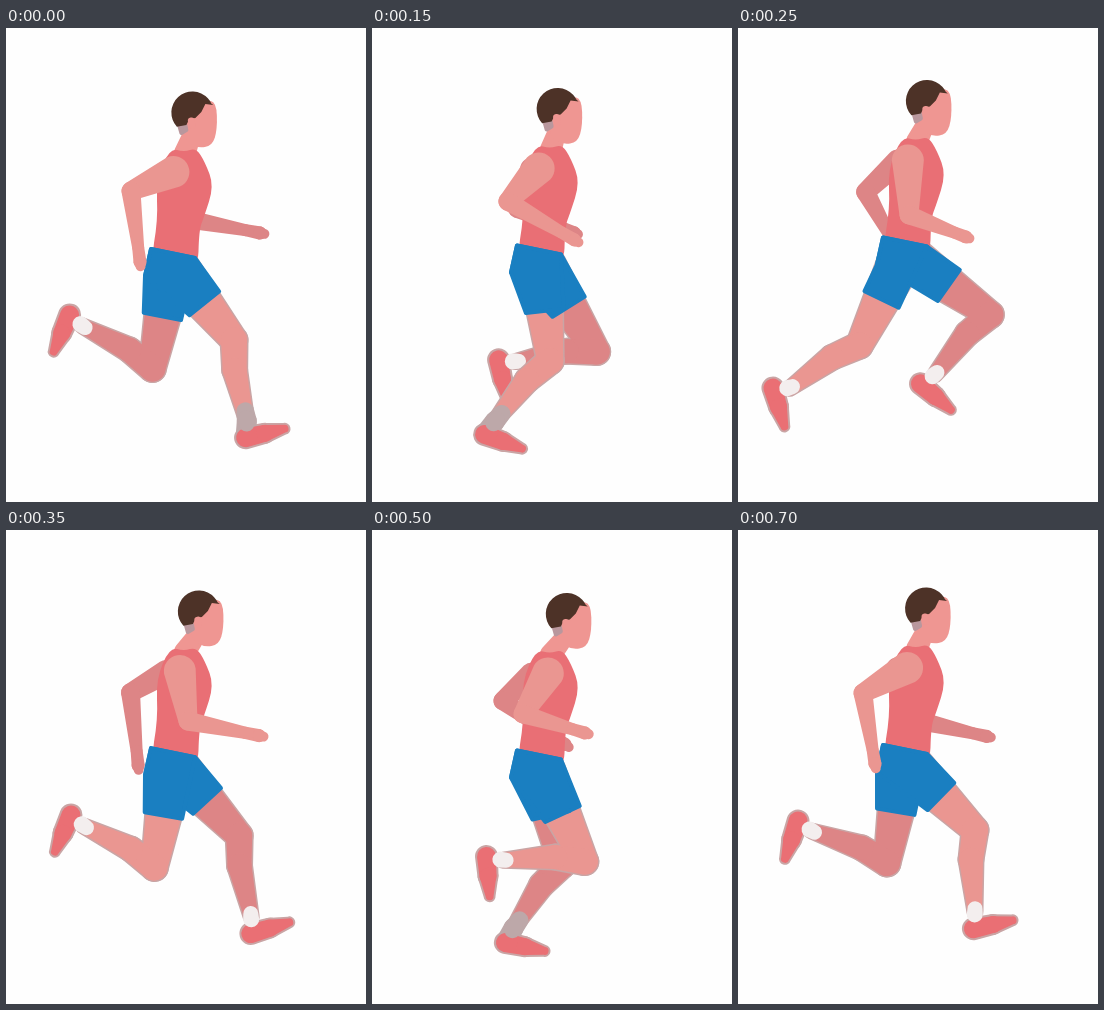
An HTML page with a canvas for the animation above (0.8 s loop, 360 by 474 pixels).

```html
<!DOCTYPE html>
<html lang="en">
<head>
<meta charset="utf-8">
<title>Runner</title>
<style>
  html, body { margin: 0; width: 100%; height: 100%; overflow: hidden; background: #fefefe; }
  canvas { display: block; }
</style>
</head>
<body>
<canvas id="stage" width="360" height="474"></canvas>
<script>
const ctx = document.getElementById('stage').getContext('2d');
const LOOP = 800, STEP = 50, CYCLE = 15, HALF = CYCLE / 2;
const SHIN = 82, FOOT = 40, GROUND = 398;
const SKIN = '#ea9691', FACE = '#ef9692', FAR = '#dd8586', SHIRT = '#e96f75', SHORTS = '#1a7fc1',
      HAIR = '#4d3227', SHOE = '#ea6f74', EDGE = '#c9a5a5', GREY = '#bda8a9', WHITE = '#f3eeee';

// One stride, shared by both sides of the body half a cycle apart.
// phase, knee x and y from the waist, shin angle backwards, foot angle downwards
const legStride = [
  [0, 61, 88, -9, -13], [2.75, 18, 112, 40, 16], [4.75, -45, 104, 52, 67], [6.5, -18, 115, 113, 109],
  [7.75, -18, 116, 120, 112], [10.25, 52, 106, 87, 82], [12.25, 85, 75, 49, 48], [14, 70, 82, 0, -12]];
// phase, elbow x and y, hand x and y
const armSwing = [
  [0, 125, 163, 134, 234], [2.75, 133, 172, 198, 213], [5, 171, 187, 228, 209], [7.5, 181, 191, 254, 205],
  [10, 151, 184, 213, 203], [12.25, 129, 165, 163, 217], [14, 125, 163, 137, 234]];

const wave = (phase, period) => Math.cos(2 * Math.PI * phase / period);
const mix = (a, b, u) => a.map((v, i) => v + (b[i] - v) * u);
const add = (a, b) => a.map((v, i) => v + b[i]);
const polar = (length, degrees) =>
  [length * Math.cos(degrees * Math.PI / 180), length * Math.sin(degrees * Math.PI / 180)];

// Smooth periodic curve through the rows.
function sample(rows, phase) {
  const n = rows.length, p = phase % CYCLE;
  const row = i => [rows[(i + n) % n][0] + CYCLE * Math.floor(i / n), ...rows[(i + n) % n].slice(1)];
  const i = rows.findLastIndex(r => r[0] <= p);
  const [before, a, b, after] = [i - 1, i, i + 1, i + 2].map(row);
  const span = b[0] - a[0], u = (p - a[0]) / span, v = 1 - u;
  const slope = (from, to, c) => (to[c] - from[c]) / (to[0] - from[0]) * span;
  return a.map((value, c) => value * v * v * (1 + 2 * u) + b[c] * u * u * (3 - 2 * u)
    + slope(before, b, c) * u * v * v - slope(a, after, c) * u * u * v).slice(1);
}

// Chain of round joints [point, radius] joined by tapered segments.
function limb(color, joints, grow = 0) {
  ctx.fillStyle = color;
  for (let i = 1; i < joints.length; i++) {
    const [a, ra] = joints[i - 1], [b, rb] = joints[i];
    const angle = Math.atan2(b[1] - a[1], b[0] - a[0]), q = Math.PI / 2;
    ctx.beginPath();
    ctx.arc(...a, ra + grow, angle + q, angle + 3 * q);
    ctx.arc(...b, rb + grow, angle - q, angle + q);
    ctx.fill();
  }
}

function polygon(color, points) {
  ctx.beginPath();
  points.forEach(p => ctx.lineTo(...p));
  ctx.closePath();
  ctx.fillStyle = ctx.strokeStyle = color;
  ctx.lineWidth = 4;
  ctx.lineJoin = 'round';
  ctx.fill();
  ctx.stroke();
}

// Closed shape with its corners rounded off.
function blob(color, points) {
  ctx.beginPath();
  points.forEach((p, i) => {
    if (!i) ctx.moveTo(...mix(points.at(-1), p, .5));
    ctx.quadraticCurveTo(...p, ...mix(p, points[(i + 1) % points.length], .5));
  });
  ctx.fillStyle = color;
  ctx.fill();
}

function poseLeg(phase, waist) {
  const [x, y, shinAngle, footAngle] = sample(legStride, phase);
  const hip = add(waist, [x * .1, 20]), knee = add(waist, [x, y]);
  const ankle = add(knee, polar(SHIN, 90 + shinAngle));
  ankle[1] = Math.min(ankle[1], GROUND);
  const calf = add(mix(knee, ankle, .36), polar(4, 180 + shinAngle));
  const heel = add(add(ankle, polar(-5, footAngle)), polar(16, footAngle + 90));
  return { hip, knee, calf, ankle, heel, toe: add(heel, polar(FOOT, footAngle)) };
}

function drawLeg(color, { hip, knee, calf, ankle, heel, toe }) {
  const leg = [[hip, 22], [knee, 13], [calf, 12], [ankle, 7]];
  const shoe = [[heel, 9.5], [mix(heel, toe, .5), 8.5], [toe, 4]];
  const planted = ankle[1] > 388;
  limb(EDGE, leg, 1.5);
  limb(EDGE, shoe, 2);
  limb(color, leg);
  if (planted) limb(GREY, [[mix(ankle, knee, .12), 9], [ankle, 10], [heel, 10]]);
  limb(SHOE, shoe);
  limb(planted ? GREY : WHITE, [[mix(ankle, knee, .04), 7.5], [mix(ankle, heel, .15), 8]]);
}

function drawArm(color, phase, shoulder, size) {
  const [x, y, handX, handY] = sample(armSwing, phase);
  const elbow = [x, y], hand = [handX, handY];
  limb(color, [[shoulder, size], [elbow, 9.5], [mix(elbow, hand, .8), 6], [hand, 6.5], [mix(elbow, hand, 1.06), 5]]);
}

function drawHead() {
  blob(FACE, [[182, 75], [200, 69], [211, 71], [212, 98], [207, 115], [192, 117], [180, 110], [178, 92]]);
  polygon('#b9979d', [[174, 95], [180, 94], [181, 99], [176, 102]]);
  ctx.fillStyle = HAIR;
  ctx.beginPath();
  ctx.arc(187, 81.5, 21, 2.4, -.45);
  [[208, 74], [200, 73], [196, 81], [190, 87], [184, 88], [181, 94]].forEach(p => ctx.lineTo(...p));
  ctx.fill();
  limb(FACE, [[[186, 90], 3.5], [[187, 95], 3]]);
}

function drawShorts(waist, legs) {
  for (const { hip, knee } of legs) {
    const hem = mix(hip, knee, .46);
    const angle = Math.atan2(knee[1] - hip[1], knee[0] - hip[0]) * 180 / Math.PI;
    polygon(SHORTS, [add(waist, [-22, -3]), add(waist, [22, 6]),
      add(hem, polar(19, angle - 90)), add(hem, polar(19, angle + 90)), add(waist, [-28, 24])]);
  }
}

function draw(step) {
  const bob = 7.5 * wave(step - 1.2, HALF), lean = 3 + 5 * wave(step - 9.3, CYCLE);
  const waist = [167, 220 + bob];
  const near = poseLeg(step, waist), far = poseLeg(step + HALF, waist);

  ctx.fillStyle = '#fefefe';
  ctx.fillRect(0, 0, 360, 474);
  drawArm(FAR, step + HALF, [160, 141 + bob], 12);
  drawLeg(FAR, far);
  drawLeg(SKIN, near);

  ctx.save();
  ctx.translate(0, bob - 1);
  limb(FACE, [[[187 + lean, 102], 9], [[179, 122], 11]]);
  ctx.translate(lean, 0);
  drawHead();
  ctx.restore();

  ctx.save();
  ctx.translate(0, bob - 2);
  blob(SHIRT, [[164, 118], [178, 122], [190, 118], [199, 132], [208, 156], [198, 187], [193, 200],
    [192, 243], [144, 236], [152, 190], [150, 150]]);
  ctx.restore();

  drawShorts(waist, [far, near]);
  drawArm(SKIN, step, [168 + lean, 140 + bob], 16);
}

function tick() {
  draw(Math.min(CYCLE - 1, Math.floor(performance.now() % LOOP / STEP)));
  requestAnimationFrame(tick);
}
tick();
</script>
</body>
</html>
```
